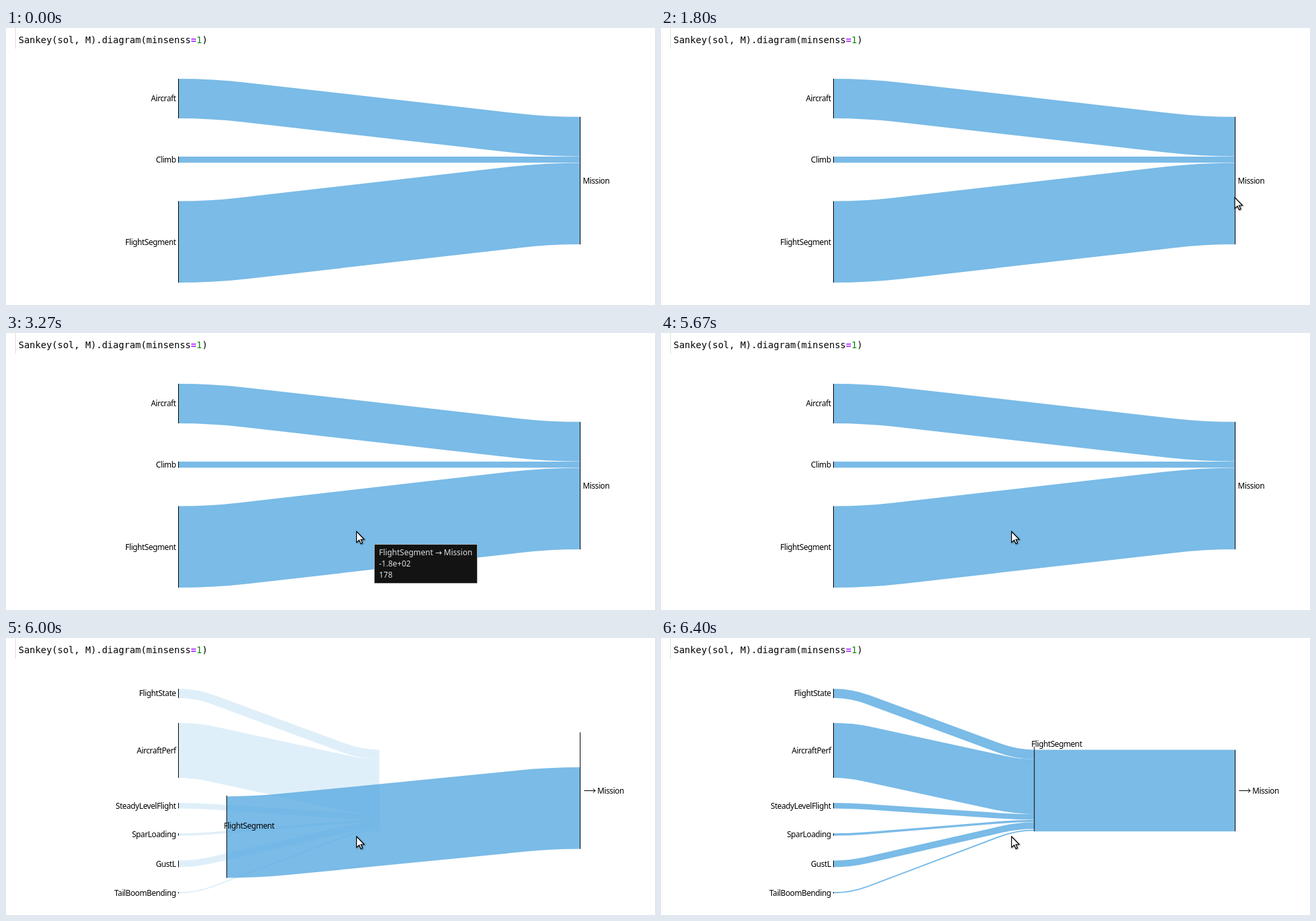
An HTML page for the animation above (8 s loop, 984 by 420 pixels).

```html
<!DOCTYPE html>
<html lang="en">
<head>
<meta charset="utf-8">
<style>
  html, body { margin: 0; width: 100%; height: 100%; overflow: hidden; background: #fff; }
  svg { display: block; }
  text { white-space: pre; }
  .code { font: 14px "DejaVu Sans Mono", monospace; }
  .label { font: 12px "Noto Sans", sans-serif; letter-spacing: -.4px; }
  .tip text { font: 12px "Noto Sans", "DejaVu Sans", sans-serif; fill: #ddd; }
  .tip tspan { font-family: "DejaVu Sans", sans-serif; }
  .tip rect { fill: #131313; stroke: #c8c8c8; stroke-width: .7; }
  .link { fill: #59aae1; }
  .node { stroke: #000; }
  .cursor { fill: #fff; stroke: #000; stroke-width: 1.2; filter: drop-shadow(1px 1px 1px #0006); }
</style>
</head>
<body>
<svg width="984" height="420" viewBox="0 0 984 420">
  <path d="M14.5 0V31.5" stroke="#ddd"/>
  <text class="code" x="19" y="23">Sankey(sol, M).diagram(minsenss<tspan fill="#a2f" font-weight="bold">=</tspan><tspan fill="#080">1</tspan>)</text>
  <g id="diagram"></g>
  <g id="tips"></g>
  <path id="cursor" class="cursor" d="M0 0V16.5L4 13 6.6 18.6 9 17.5 6.5 12H11.6Z"/>
</svg>
<script>
const LOOP = 8000, FPS = 15;
const LEFT = 261.5, MID = 566, RIGHT = 870.5, FLOW = 123.6;
const el = id => document.getElementById(id);
const mix = (a, b, p) => a + (b - a) * p;

// name, centre at the left, thickness, centre at the right
const overview = [
  ['Aircraft', 107, 60, 164.7],
  ['Climb', 199.6, 9.4, 199.6],
  ['FlightSegment', 324.3, FLOW, 266.3],
];
const detail = [
  ['FlightState', 84, 14.2, 176.6],
  ['AircraftPerf', 170.4, 83.2, 225.3],
  ['SteadyLevelFlight', 254.2, 8.4, 271.3],
  ['SparLoading', 298, 3.4, 277.4],
  ['GustL', 342.5, 10, 284.6],
  ['TailBoomBending', 386.2, 2, 291.4],
];

// step, x, y of the pointer tip
const pointer = [
  [17, 962, 227], [19, 915, 258], [21, 885, 269], [24, 873, 262], [27, 870, 257],
  [35, 870, 257], [36, 850, 262], [37, 770, 285], [38, 665, 312], [39, 597.5, 321.5],
  [41, 563, 313], [44, 548, 304], [47, 536, 301], [48, 533, 300], [49, 531.5, 301],
];

// A band of constant thickness: arc, straight run, opposite arc
function link(x0, y0, x1, y1, width, opacity = .8) {
  const h = width / 2, dx = x1 - x0, dy = Math.abs(y1 - y0), f = y1 > y0 ? 1 : -1;
  let d;
  if (dy < .5) {
    d = `M${x0} ${y0 - h}H${x1}V${y1 + h}H${x0}Z`;
  } else {
    const r = .55 * (dx * dx + dy * dy) / (4 * dy), cy = dy - 2 * r;
    const a = Math.PI / 2 + Math.atan2(cy, dx) - Math.acos(2 * r / Math.hypot(dx, cy));
    const sin = Math.sin(a), cos = Math.cos(a), rise = f * r * (1 - cos);
    const hs = h * f * sin, hc = h * cos;
    const xa = x0 + r * sin, ya = y0 + rise, xb = x1 - r * sin, yb = y1 - rise;
    const sweep = f > 0 ? 1 : 0;
    const arc = (rad, s, x, y) => `A${rad} ${rad} 0 0 ${s} ${x} ${y}`;
    d = `M${x0} ${y0 - h}` + arc(r + f * h, sweep, xa + hs, ya - hc) +
      `L${xb + hs} ${yb - hc}` + arc(r - f * h, 1 - sweep, x1, y1 - h) +
      `V${y1 + h}` + arc(r + f * h, sweep, xb - hs, yb + hc) +
      `L${xa - hs} ${ya + hc}` + arc(r - f * h, 1 - sweep, x0, y0 + h) + 'Z';
  }
  return `<path class="link" opacity="${opacity}" d="${d}"/>`;
}

const node = (x, top, bottom) => `<path class="node" d="M${x} ${top}V${bottom}"/>`;
const label = (text, x, y, anchor = 'start') =>
  `<text class="label" x="${x}" y="${y + 4.4}" text-anchor="${anchor}">${text}</text>`;
const leftNode = ([name, y, w]) =>
  node(LEFT, y - w / 2, y + w / 2) + label(name, LEFT - 3.8, y, 'end');

function drawOverview() {
  return overview.map(([, y, w, end]) => link(LEFT, y, RIGHT, end, w)).join('') +
    overview.map(leftNode).join('') +
    node(RIGHT, 134.7, 328.2) + label('Mission', 874.5, 231.4);
}

function drawDetail(p) {
  const x = mix(LEFT, MID, p), y = mix(324.3, 231.4, p), end = mix(266.3, 231.4, p), h = FLOW / 2;
  return detail.map(([, y0, w, y1]) => link(LEFT, y0, MID, y1, w, .8 * p)).join('') +
    link(x, y, RIGHT, end, FLOW) +
    detail.map(leftNode).join('') +
    node(x, y - h - 5 * p, y + h) +
    label('FlightSegment', x - 4.5, mix(324.3, 160.3, p)) +
    node(RIGHT, mix(134.7, 169.6, p), mix(328.2, 293.2, p)) +
    '<path d="M876.5 231.5H893.5M890 228.5L893.5 231.5 890 234.5" fill="none" stroke="#000"/>' +
    label('Mission', 896.5, 231.4);
}

function tip(x, y, w, h, lines) {
  return `<g class="tip"><rect x="${x}" y="${y}" width="${w}" height="${h}"/>` +
    lines.map((s, i) => `<text x="${x + 7}" y="${y + 16 + 17 * i}">${s}</text>`).join('') + '</g>';
}
const nodeTip = tip(881, 274, 57, 24, ['Mission']);
const linkTip = tip(558.5, 320.5, 156, 59,
  ['FlightSegment <tspan>→</tspan> Mission', '-1.8e+02', '178']);

function pointerAt(n) {
  const i = pointer.findIndex(k => k[0] > n);
  if (i < 0) return pointer.at(-1).slice(1);
  const [n0, x0, y0] = pointer[i - 1], [n1, x1, y1] = pointer[i], p = (n - n0) / (n1 - n0);
  return [mix(x0, x1, p), mix(y0, y1, p)];
}

let shown = -1;
function frame(now) {
  const n = Math.floor((now % LOOP + 4) * FPS / 1000);
  if (n !== shown) {
    shown = n;
    const p = Math.min(1, Math.max(0, (n - 88.1) / 7.9));
    el('diagram').innerHTML = n < 88 ? drawOverview() : drawDetail(p);
    el('tips').innerHTML = n >= 35 && n < 40 ? nodeTip : n >= 47 && n < 85 ? linkTip : '';
    const visible = n >= 17;
    el('cursor').style.display = visible ? '' : 'none';
    if (visible) el('cursor').setAttribute('transform', `translate(${pointerAt(n)})`);
  }
  requestAnimationFrame(frame);
}
const start = performance.now();
const tick = frame;
frame(0);
</script>
</body>
</html>
```
